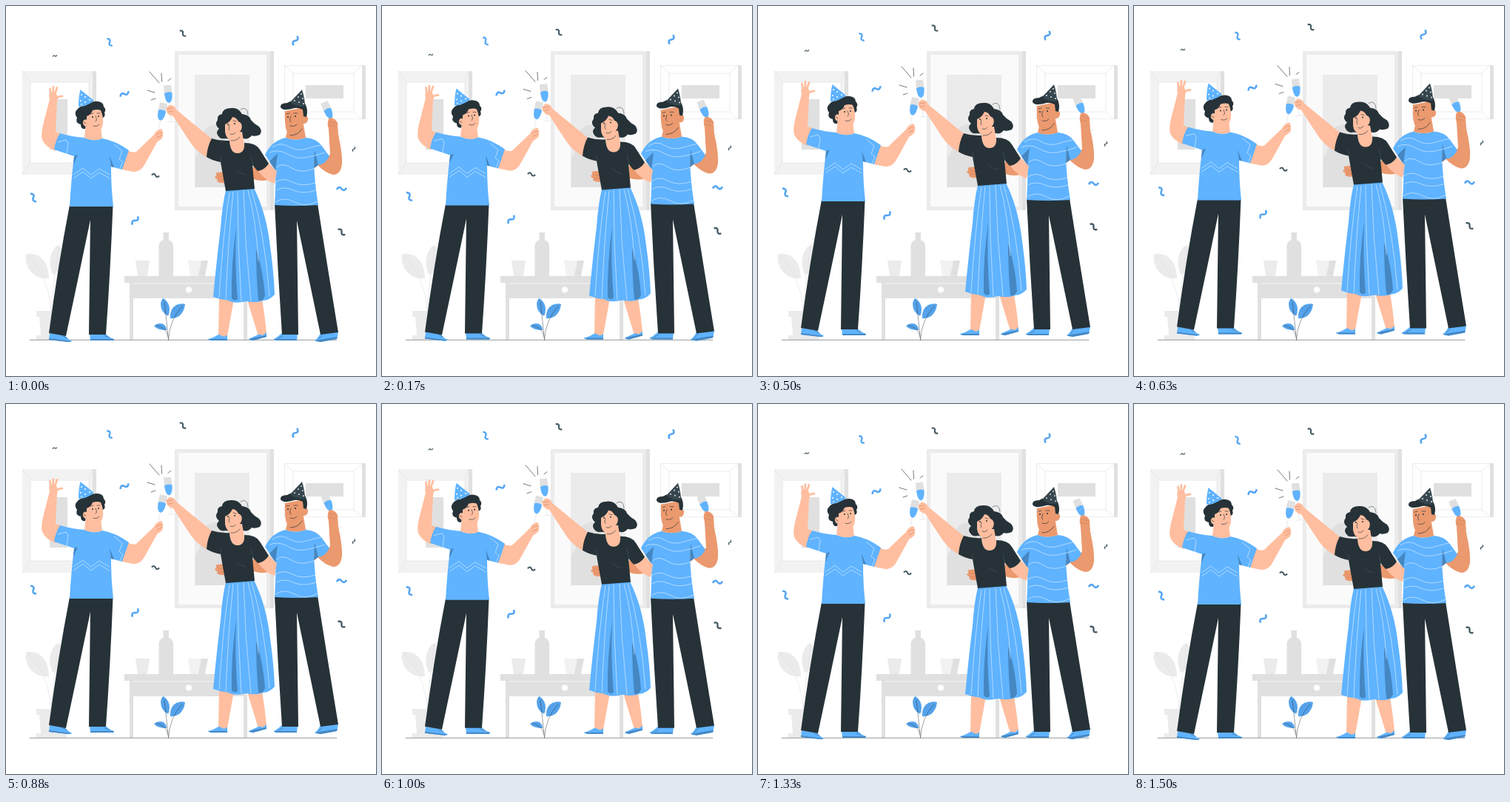
Animation of 500x500 px, one loop 1540 ms. Source, as an HTML page:

```html
<!DOCTYPE html>
<html lang="en">
<head>
<meta charset="utf-8">
<title>Party toast</title>
<style>
  html, body { margin: 0; height: 100%; overflow: hidden; background: #fff; }
  svg { display: block; width: 100vw; height: 100vh; }
  .blue { fill: #5fb3ff; }
  .leaf { fill: #55a2ea; }
  .deep { fill: #4587c2; }
  .dark { fill: #263238; }
  .skin { fill: #ffbe9f; }
  .tan { fill: #eb996e; }
  .g0 { fill: #fafafa; }
  .g1 { fill: #f2f2f2; }
  .g2 { fill: #ebebeb; }
  .g3 { fill: #e0e0e0; }
  .white { fill: #fff; }
  .line { fill: none; stroke: #263238; stroke-width: .65; stroke-linecap: round; }
  .trim { fill: none; stroke: #fff; stroke-width: .6; stroke-linejoin: round; stroke-opacity: .85; }
  .edge { fill: none; stroke: #e2e2e2; stroke-width: .7; }
  .crease { fill: none; stroke: #c9805a; stroke-width: .6; stroke-linecap: round; }
  .finger { fill: none; stroke: #ffbe9f; stroke-width: 2.8; stroke-linecap: round; }
  #confetti path { fill: none; stroke-width: 2.4; }
</style>
</head>
<body>
<svg viewBox="0 0 500 500">
  <defs>
    <g id="flute">
      <path class="edge" d="M0 23V50M-5 50H5"/>
      <path class="g3" d="M-5 0H5Q6 10 4.5 18Q3 24 0 24Q-3 24-4.5 18Q-6 10-5 0Z"/>
      <path class="blue" d="M-5.3 11Q0 8 5.3 11Q5.200 15 4.500 18Q3 24 0 24Q-3 24-4.500 18Z"/>
    </g>
  </defs>

  <g id="room">
    <path class="g3" d="M22 88H122V228H22Z"/>
    <path class="g1" d="M22 88H117V228H22Z"/>
    <path class="white" d="M33 103H112V212H33Z"/>
    <path class="edge" d="M22 88L33 103V212L22 228M33 103H112V212H33M117 88L112 103M117 228L112 212"/>
    <path class="g3" d="M59 126H83V194H59Z"/>

    <path class="g3" d="M228 61H362V276H228Z"/>
    <path class="g2" d="M228 61H357V276H228Z"/>
    <path class="g0" d="M233 66H352V271H233Z"/>
    <path class="g2" d="M255 93H329V245H255Z"/>
    <path class="g3" d="M256 245V204Q264 196 265 178Q267 161 284 160Q306 160 308 185L318 245Z"/>
    <path class="edge" d="M301 96Q304 97 306 100"/>

    <path class="g3" d="M376 80H486V153H376Z"/>
    <path class="white" d="M376.6 80.6H481V152.4H376.6Z"/>
    <path class="edge" d="M388 91H470V143H388ZM376 80L388 91M481 80L470 91M376 153L388 143M481 153L470 143"/>
    <path class="g3" d="M405 107H456V125H405Z"/>

    <g class="g2">
      <path d="M58 368Q40 370 30 354Q24 341 28 335Q47 333 55 351Q58 359 58 368Z"/>
      <path d="M63 363Q56 347 62 333Q66 324 72 323Q79 333 76 350Q72 361 63 363Z"/>
      <path class="edge" d="M30 338Q58 366 61 412M71 327Q64 372 61 412"/>
      <path d="M41 412H82V420H41ZM45 420H78L76 445H47ZM41 445H82V451H41Z"/>
    </g>

    <path class="g3" d="M160 365H333V374H160ZM167 374H172V451H167ZM321 374H326V451H321Z"/>
    <path class="g2" d="M172 374H321V395H172Z"/>
    <path class="g3" d="M172 376H321V395H172Z"/>
    <circle class="white" cx="247" cy="383.5" r="4"/>
    <path class="g3" d="M212.5 306H220V316Q226 318 226 325V365H206.500V325Q206.500 318 212.500 316Z"/>
    <path class="g2" d="M175 344H194L191 365H178Z"/>
    <path class="g1" d="M246 344H266L264 365H249Z"/>
    <path class="g3" d="M264 344H273L269 365H260Z"/>
    <path class="line" d="M32 451.3H447" style="stroke-width:.5"/>

    <g class="leaf">
      <path d="M219 419Q209 414 209 402Q210 396 213 395Q221 401 221 410Q221 415 219 419Z"/>
      <path d="M222 422Q221 409 230 404Q238 401 242 403Q241 413 234 419Q228 423 222 422Z"/>
      <path d="M217 438Q204 438 200 432Q206 427 213 430Q217 433 217 438Z"/>
    </g>
    <path class="line" d="M214 400Q217 425 219.500 451M238 406Q221 424 219.500 451M204 432Q217 434 219 447" stroke-opacity=".7"/>
  </g>

  <g id="party">
    <g id="confetti"></g>
    <path class="line" d="M194 89L207 104M210 91L210.5 102M191 114L201 117M196 127L202 125M219 101L223 98"/>

    <g id="host">
      <path class="skin" d="M73 172L67 196Q54 191 49 181Q47 174 50 161L59 126Q57 120 60 117H67Q71 122 69 130L67 170Z"/>
      <path class="finger" d="M60.500 120L59.500 112M63.500 119L64 109.500M66 119L69 110.500M67.500 126Q70 122 76 122"/>
      <path class="blue" d="M59 442L80 445Q82 450 89 452.500Q88 454 84 454L58 451ZM113 443H135Q139 448 146 450Q146 452 143 452H114Z"/>
      <path class="deep" d="M58 449L88 453Q87 454 84 454L58 451ZM114 450H146Q146 452 143 452H114Z"/>
      <path class="line" d="M77 446L83 449M132 445L139 448" stroke-opacity=".6"/>
      <path class="dark" d="M86 269H144.500Q141 360 135 444H112L114 289Q98 366 81 446L58 442Q70 352 86 269Z"/>
      <use href="#flute" transform="translate(213 131) rotate(11)"/>
      <path class="skin" d="M164 195Q171 199 176 197L200 174Q203 167 210 166Q214 171 211 179Q207 182 204 184L188 213Q182 225 172 224L157 221Z"/>
      <path class="crease" d="M203 174Q207 170 210 171M204 178L210 175"/>
      <path class="blue" d="M73 172Q90 177 106 178Q118 184 130 179Q148 182 166 195L157 221L142 217Q142 245 145 271H86Q88 235 92 203L65 194Q67 181 73 172Z"/>
      <path class="deep" d="M140 203L146 218L142 217ZM92 203L97 201L91 215Z"/>
      <path class="trim" d="M91 228L104 219L115 228L126 220L140 228M91 233L104 224L115 233L126 225L140 233M70 184L81 181L84 185L82 200M146 187L157 196L153 207L158 211L154 220"/>
      <path class="skin" d="M108 160L128 164L130 179Q118 184 106 178Z"/>
      <path class="dark" d="M107 166Q101 167 101 160Q93 158 96 151Q91 144 97 139Q100 135 106 135Q116 128 124 129Q132 130 132 136Q136 140 133 144Q135 149 131 151L110 150Z"/>
      <path class="skin" d="M109 149Q115 147 117 141Q124 139 128 141Q132 150 131 160Q128 173 120 172Q110 170 108 163Q103 161 104 156Q106 152 109 154Z"/>
      <path class="blue" d="M100.500 113L119 128Q111 135 98 136Q98 123 100.500 113Z"/>
      <g class="white">
        <circle cx="102" cy="120" r="1"/><circle cx="107" cy="123" r="1"/><circle cx="101" cy="128" r="1"/>
        <circle cx="107" cy="130" r="1"/><circle cx="113" cy="127" r="1"/><circle cx="102" cy="133" r=".9"/>
      </g>
      <path class="line" d="M114 146L118 145M123 145L127 145M121 149Q124 155 121 156M118 162Q123 164 126 160M105 157L108 159"/>
      <circle class="dark" cx="117" cy="150" r="1"/><circle class="dark" cx="125" cy="149" r="1"/>
    </g>

    <g id="friend">
      <path class="tan" d="M333 218L350 215L364 232Q348 239 334 234ZM298 224L285 225Q282 227 285 229L282 231Q283 234 286 234L285 237Q289 240 297 239Z"/>
      <path class="crease" d="M285 229L294 231M286 234L294 235"/>
      <path class="blue" d="M373 442Q366 448 362 450Q362 452 366 452H393L394 443ZM425 442Q421 450 417 452Q420 454 425 454L447 450L449 441Z"/>
      <path class="deep" d="M362 450H393V452H366ZM417 452L448 447L447 450L425 454Z"/>
      <path class="line" d="M374 446L368 449M427 445L422 450" stroke-opacity=".6"/>
      <path class="dark" d="M363 267H421Q434 350 449 441L425 444L393 290L395 444H373Q367 355 363 267Z"/>
      <use href="#flute" transform="translate(430 130) rotate(-23)"/>
      <path class="tan" d="M434 205L438 200L436 166Q433 157 437 151Q445 151 448 158L449 174Q455 200 454 214Q452 228 442 228Q432 226 421 215Z"/>
      <path class="crease" d="M438 156L447 159M437 161L445 163"/>
      <path class="skin" d="M415 207Q422 207 421 214Q420 220 415 219Z"/>
      <path class="blue" d="M378 178Q390 183 405 178Q419 179 426 188L437 203Q431 215 421 215L416 210Q417 240 422 269Q392 271 363 269Q365 240 364 221L350 201Q359 182 378 178Z"/>
      <path class="deep" d="M417 195L422 215L416 219ZM367 199L356 210L364 222Z"/>
      <path class="trim" d="M360 191Q371 183 382 190T406 193T426 188M356 198Q368 193 380 200T404 205T431 198M366 218Q374 211 386 219T416 220M365 238Q374 231 387 238T418 239M365 249Q375 243 388 249T419 249M364 265Q376 257 390 265T421 264"/>
      <path class="tan" d="M381 165L402 160L405 178Q390 183 378 178Z"/>
      <path class="tan" d="M377 142L402 137L403 149Q409 148 408 154Q407 159 402 159Q401 169 394 173Q387 176 381 172Q376 166 377 142Z"/>
      <path class="dark" d="M371 137Q370 131 380 131Q392 124 403 130Q409 139 406 150L402 149L401 140Q393 136 386 139Q374 142 371 137Z"/>
      <path fill="#37474f" d="M400 113Q404 125 404 136Q393 137 384 130Z"/>
      <g class="white">
        <circle cx="399" cy="119" r=".9"/><circle cx="395" cy="123" r=".9"/><circle cx="401" cy="125" r=".9"/>
        <circle cx="390" cy="128" r=".9"/><circle cx="396" cy="130" r=".9"/><circle cx="402" cy="132" r=".9"/>
      </g>
      <path class="line" d="M379 146L383 145M389 145L394 145M385 149Q382 156 385 157M384 162Q389 164 393 160M384 175Q395 175 400 166"/>
      <circle class="dark" cx="381" cy="150" r="1"/><circle class="dark" cx="391" cy="149" r="1"/>
    </g>

    <g id="guest">
      <path class="skin" d="M340 222L354 212Q361 219 366 223L363 240Q350 236 340 222Z"/>
      <path class="skin" d="M288 394L308 396L299 446H287ZM326 397L346 396Q350 420 352 442L341 446Z"/>
      <path class="blue" d="M287 444Q279 449 273 450Q274 452 278 452H299V445ZM341 444L328 450Q329 452 334 452L352 447V441Z"/>
      <path class="deep" d="M273 450H299V452H278ZM328 450L352 445V447L334 452Z"/>
      <path class="skin" d="M288 444H299L295 447ZM341 443L352 441L347 445Z"/>
      <path class="blue" d="M297 249L335 246Q352 280 357 325Q362 360 363 390Q357 397 348 398Q337 402 325 399Q308 403 301 398Q290 397 280 393Q285 340 290 300Q292 270 297 249Z"/>
      <path class="deep" d="M311 300Q304 350 305 395Q309 400 313 396Q309 350 311 300ZM338 328Q338 365 341 398Q347 400 350 392Q348 360 338 328Z"/>
      <path class="trim" d="M302 252Q293 310 288 394M307 251Q300 320 297 397M313 250Q313 325 318 399M321 249Q323 325 331 399M327 249Q338 290 341 345M332 249Q350 310 356 392"/>
      <use href="#flute" transform="translate(218 107) rotate(-6)"/>
      <path class="skin" d="M281 182L230 140Q227 133 221 134Q216 136 217 142Q219 148 226 149Q240 171 251 187Q260 199 273 205Z"/>
      <path class="crease" d="M218 139L225 138M219 143L225 142"/>
      <path class="dark" d="M297 179Q288 181 285 172Q285 168 288 166Q281 160 286 154Q285 147 292 146Q293 138 304 138Q314 137 319 146Q329 147 331 154Q336 160 342 163Q347 169 343 174Q336 177 332 175Q327 182 317 178L305 180Z"/>
      <path class="line" d="M317 140Q323 136 326 142L327 147" style="stroke-width:.5"/>
      <path class="skin" d="M303 170H319L322 187Q324 200 314 200Q303 199 302 183Z"/>
      <path class="skin" d="M296 160Q303 157 306 150Q311 150 314 156Q321 159 318 167L315 171Q313 182 305 182Q297 179 296 170Z"/>
      <path class="line" d="M297 156L301 155M307 155L311 156M302 161Q300 166 302 168M303 173Q307 175 310 171M304 182Q311 183 316 177"/>
      <circle class="dark" cx="300" cy="160" r="1"/><circle class="dark" cx="309" cy="159" r="1"/>
      <path class="dark" d="M278 179Q290 183 302 182Q303 200 314 199Q323 198 322 185Q338 185 343 194L355 213Q349 222 340 223L333 215L336 247L297 250Q293 228 290 211Q279 209 271 204Q272 190 278 179Z"/>
      <path class="line" style="stroke:#46545b" d="M311 221Q316 227 324 228M290 204L291 212M331 203L334 216"/>
    </g>
  </g>
</svg>
<script>
const LOOP = 1540, RISE = 8.8, LEAD = 45;
const BLUE = '#55a6f2', DARK = '#455a64';
const party = document.getElementById('party');

// x, y, angle, scale, colour
const streamers = [
  [140, 49, 62, 1, BLUE], [239, 37, 48, .9, DARK], [391, 47, -60, 1.1, BLUE],
  [66, 67.5, -15, .5, DARK], [160, 119, -25, 1.1, BLUE], [202, 229, 15, .85, DARK],
  [37, 259, 62, 1.1, BLUE], [174.5, 290, -48, 1.1, BLUE], [453.5, 247, 0, 1.1, BLUE],
  [453.5, 305.5, 45, 1, DARK], [470, 193.5, -65, .55, DARK],
];
document.getElementById('confetti').innerHTML = streamers.map(([x, y, angle, scale, colour]) =>
  `<path d="M-6 1q3-5 6-1t6-1" stroke="${colour}" transform="translate(${x} ${y}) rotate(${angle}) scale(${scale})"/>`
).join('');

function draw() {
  const phase = (performance.now() + LEAD) / LOOP * 2 * Math.PI;
  const lift = RISE * (1 - Math.cos(phase)) / 2;
  party.setAttribute('transform', `translate(0 ${-lift})`);
  requestAnimationFrame(draw);
}
draw();
</script>
</body>
</html>
```
